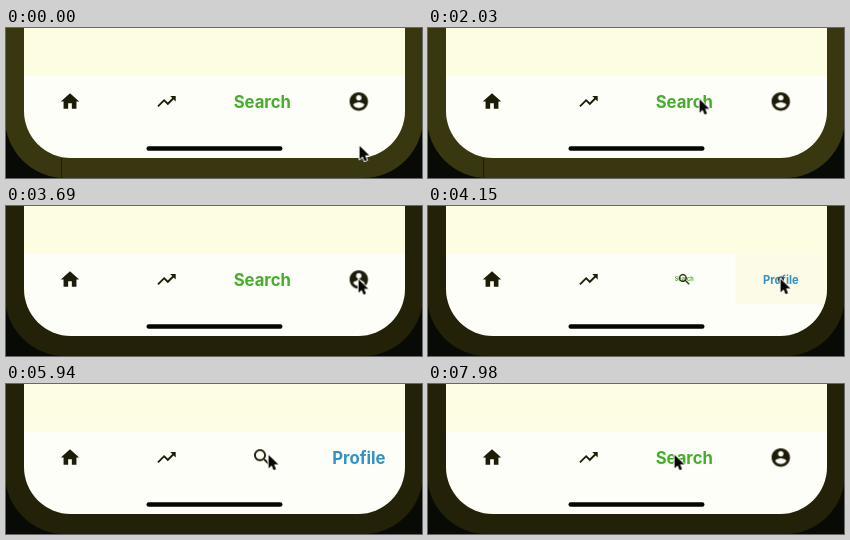
Animation, 416 px wide and 150 px high, one loop 8000 ms. Source, as an HTML page:

```html
<!DOCTYPE html>
<html lang="en">
<head>
<meta charset="utf-8">
<title>Bottom navigation</title>
<style>
  html, body { margin: 0; width: 100%; height: 100%; overflow: hidden; background: #070a05; }
  svg { display: block; width: 416px; height: 150px; }
  text { font: 700 16.7px Inter, "Liberation Sans", sans-serif; text-anchor: middle; }
  .icon { fill: #1d1c08; }
  .grow, .shrink, .cursor, .bezel, .seam, .ripple { animation: 8s linear infinite; }

  /* Profile is active between the two taps */
  .grow { animation-name: grow; }
  .shrink { animation-name: shrink; }
  @keyframes grow {
    0%, 49.375% { transform: scale(0); }
    53.125%, 89.25% { transform: scale(1); }
    93%, 100% { transform: scale(0); }
  }
  @keyframes shrink {
    0%, 49.375% { transform: scale(1); }
    53.125%, 89.25% { transform: scale(0); }
    93%, 100% { transform: scale(1); }
  }

  .ripple { fill: #f4f2b6; opacity: 0; }
  .tap-profile { animation-name: tap-profile; }
  .tap-search { animation-name: tap-search; }
  @keyframes tap-profile {
    0%, 47.6% { opacity: 0; }
    49%, 50.4% { opacity: 1; }
    52.4%, 100% { opacity: 0; }
  }
  @keyframes tap-search {
    0%, 87.4% { opacity: 0; }
    88.8%, 90.8% { opacity: 1; }
    92.8%, 100% { opacity: 0; }
  }

  .bezel { animation-name: bezel; animation-timing-function: step-end; }
  @keyframes bezel { 0% { fill: #39370f; } 43.75%, 100% { fill: #232108; } }
  .seam { fill: #1e1c06; animation-name: seam; animation-timing-function: step-end; }
  @keyframes seam { 0% { opacity: 1; } 43.75%, 100% { opacity: 0; } }

  .cursor { animation-name: cursor; animation-timing-function: ease-in-out; }
  @keyframes cursor {
    0% { transform: translate(353px, 117px); }
    10.25% { transform: translate(352px, 77px); }
    11.5%, 18.625% { transform: translate(352px, 73px); }
    27.75%, 29% { transform: translate(258px, 70px); }
    36% { transform: translate(358px, 73px); }
    37.875%, 40% { transform: translate(352px, 73px); }
    51.875%, 60.75% { transform: translate(352px, 72px); }
    71% { transform: translate(264px, 70px); }
    74.25% { transform: translate(262px, 70px); }
    81%, 92.5% { transform: translate(256.5px, 70px); }
    99.75%, 100% { transform: translate(246px, 70px); }
  }
</style>
</head>
<body>
<svg viewBox="0 0 416 150">
  <defs>
    <path id="home" d="M10 20v-6h4v6h5v-8h3L12 3 2 12h3v8z"/>
    <path id="trend" d="M16 6l2.29 2.29-4.88 4.88-4-4L2 16.59 3.41 18l6-6 4 4 6.3-6.29L22 12V6z"/>
    <path id="search" d="M15.5 14h-.79l-.28-.27C15.41 12.59 16 11.11 16 9.5 16 5.91 13.09 3 9.5 3S3 5.91 3 9.5 5.91 16 9.5 16c1.61 0 3.09-.59 4.23-1.57l.27.28v.79l5 4.99L20.49 19l-4.99-5zm-6 0C7.01 14 5 11.99 5 9.5S7.01 5 9.5 5 14 7.01 14 9.5 11.99 14 9.5 14z"/>
    <path id="account" d="M12 2C6.48 2 2 6.48 2 12s4.48 10 10 10 10-4.48 10-10S17.52 2 12 2zm0 3c1.66 0 3 1.34 3 3s-1.34 3-3 3-3-1.34-3-3 1.34-3 3-3zm0 14.2c-2.5 0-4.71-1.28-6-3.22.03-1.99 4-3.08 6-3.08 1.99 0 5.97 1.09 6 3.08-1.29 1.94-3.5 3.22-6 3.22z"/>
    <clipPath id="screen"><rect x="18" y="-80" width="381" height="210" rx="47"/></clipPath>
  </defs>

  <!-- Phone -->
  <rect class="bezel" x="-1" y="-90" width="418" height="240" rx="60"/>
  <rect class="seam" x="55" y="130" width="1" height="20"/>
  <g clip-path="url(#screen)">
    <rect width="416" height="48" fill="#fdfde2"/>
    <rect y="48" width="416" height="82" fill="#fefef8"/>
    <rect class="ripple tap-search" x="211" y="48" width="92" height="50"/>
    <rect class="ripple tap-profile" x="307.5" y="48" width="92" height="50"/>
  </g>
  <rect x="140.5" y="118.3" width="136" height="4.4" rx="2.2" fill="#050502"/>

  <!-- Tabs -->
  <g transform="translate(64 73.5)">
    <use class="icon" href="#home" transform="scale(.92) translate(-12 -12)"/>
  </g>
  <g transform="translate(160.5 73.5)">
    <use class="icon" href="#trend" transform="scale(.92) translate(-12 -12)"/>
  </g>
  <g transform="translate(256.3 73.5)">
    <g class="shrink"><text y="6" fill="#46ad2c">Search</text></g>
    <g class="grow"><use class="icon" href="#search" transform="scale(.92) translate(-12 -12)"/></g>
  </g>
  <g transform="translate(352.8 73.5)">
    <g class="grow"><text y="6" fill="#3093c4">Profile</text></g>
    <g class="shrink"><use class="icon" href="#account" transform="scale(.92) translate(-12 -12)"/></g>
  </g>

  <g class="cursor">
    <path d="M0 0v14.5l3.3-3.1 2.1 5 2.6-1.1-2.1-4.9h4.6z" transform="translate(.5 .8) scale(.93)" fill="#050502" stroke="#fff" stroke-width="2" paint-order="stroke" stroke-linejoin="round"/>
  </g>
</svg>
</body>
</html>
```
